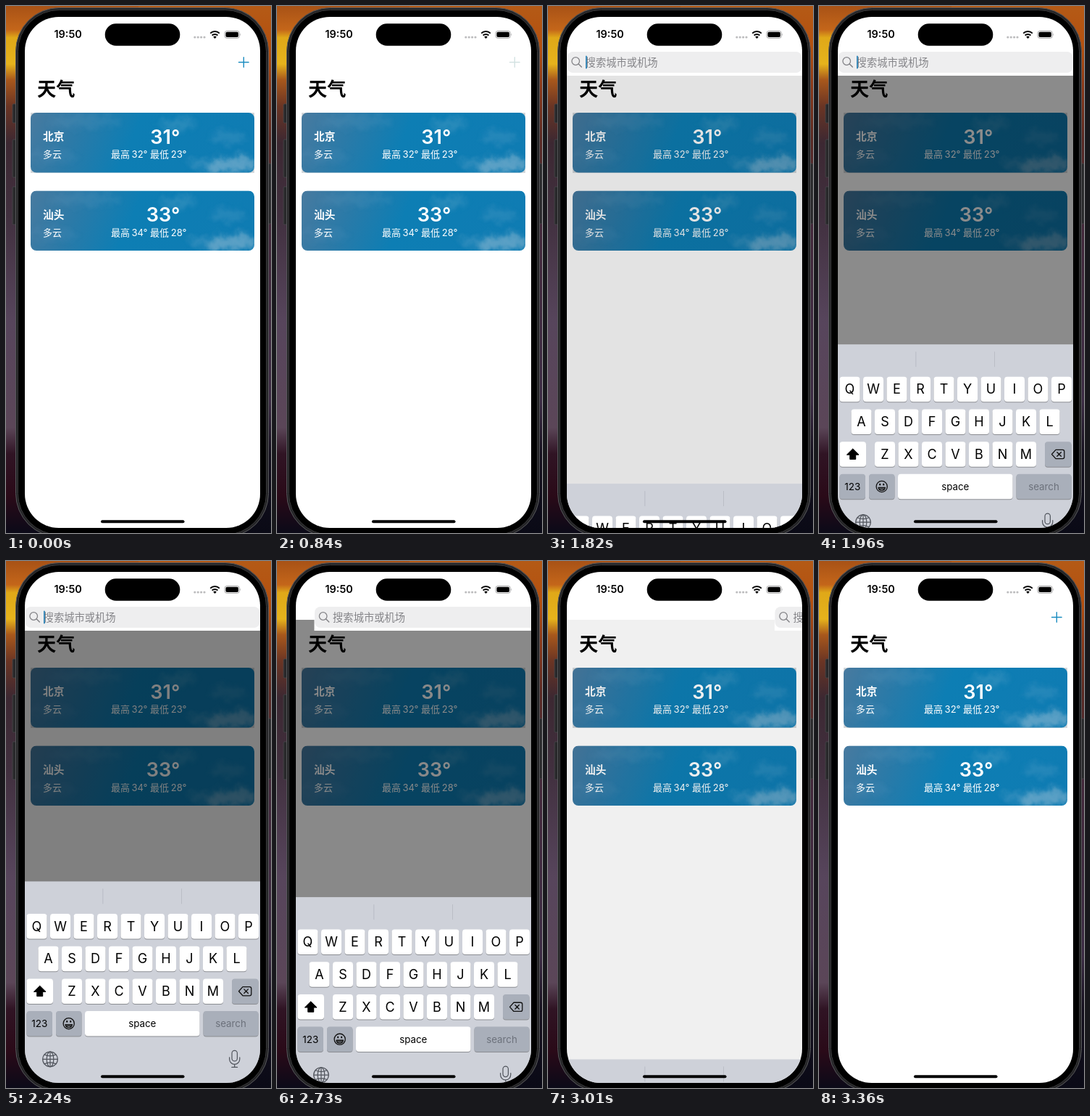
An HTML page for the animation above (3.64 s loop, 366 by 726 pixels).

```html
<!DOCTYPE html>
<html lang="zh">
<head>
<meta charset="utf-8">
<style>
  html, body { margin: 0; width: 100%; height: 100%; overflow: hidden; background: #000; }
  svg { display: block; width: 366px; height: 726px; }
  text { font-family: Inter, "Noto Sans CJK SC", "Noto Sans CJK", sans-serif; white-space: pre; }
  .mid { text-anchor: middle; }
  .end { text-anchor: end; }
  .line { fill: none; stroke-linecap: round; stroke-linejoin: round; }
</style>
</head>
<body>
<svg viewBox="0 0 366 726">
  <defs>
    <linearGradient id="skyL" x2="0" y2="1">
      <stop offset="0" stop-color="#a85216"/><stop offset=".045" stop-color="#c4661a"/>
      <stop offset=".06" stop-color="#dfa818"/><stop offset=".11" stop-color="#e6b31c"/>
      <stop offset=".14" stop-color="#a8581c"/><stop offset=".19" stop-color="#6b3524"/>
      <stop offset=".26" stop-color="#3c2832"/><stop offset=".4" stop-color="#41303f"/>
      <stop offset=".6" stop-color="#57455c"/><stop offset=".8" stop-color="#5b4658"/>
      <stop offset=".85" stop-color="#301424"/><stop offset=".93" stop-color="#2a0a18"/>
      <stop offset="1" stop-color="#0b0a18"/>
    </linearGradient>
    <linearGradient id="skyR" x2="0" y2="1">
      <stop offset="0" stop-color="#b45a16"/><stop offset=".08" stop-color="#b4500f"/>
      <stop offset=".15" stop-color="#8c3a1a"/><stop offset=".25" stop-color="#5a2a24"/>
      <stop offset=".4" stop-color="#43283a"/><stop offset=".75" stop-color="#3c2c44"/>
      <stop offset=".85" stop-color="#15101e"/><stop offset="1" stop-color="#0a0a16"/>
    </linearGradient>
    <linearGradient id="blue" x2="1" y2=".12">
      <stop offset="0" stop-color="#487a9f"/><stop offset=".25" stop-color="#2a7aa8"/>
      <stop offset=".5" stop-color="#0d7eb4"/><stop offset="1" stop-color="#0f7cb3"/>
    </linearGradient>
    <filter id="cloud" x="-5%" y="-10%" width="110%" height="120%">
      <feGaussianBlur stdDeviation="4" result="soft"/>
      <feTurbulence type="fractalNoise" baseFrequency=".07" numOctaves="3" seed="4"/>
      <feDisplacementMap in="soft" scale="16" xChannelSelector="R" yChannelSelector="G"/>
    </filter>
    <clipPath id="screen"><rect x="26" y="15" width="325" height="704" rx="47"/></clipPath>
    <clipPath id="cardClip"><rect width="309" height="82.6" rx="8"/></clipPath>
    <g id="sky" clip-path="url(#cardClip)">
      <rect width="309" height="83" fill="url(#blue)"/>
      <g filter="url(#cloud)" fill="#9dc0d6">
        <ellipse cx="290" cy="69" rx="20" ry="9" opacity=".5"/>
        <ellipse cx="259" cy="71" rx="15" ry="8" opacity=".5"/>
        <ellipse cx="274" cy="78" rx="30" ry="6" opacity=".3"/>
        <ellipse cx="232" cy="72" rx="14" ry="6" opacity=".25"/>
        <ellipse cx="203" cy="16" rx="26" ry="7" opacity=".2"/>
        <ellipse cx="272" cy="34" rx="24" ry="8" opacity=".16"/>
        <ellipse cx="75" cy="12" rx="50" ry="9" opacity=".1"/>
        <ellipse cx="30" cy="60" rx="35" ry="10" opacity=".08"/>
      </g>
    </g>
  </defs>

  <rect width="183" height="726" fill="url(#skyL)"/>
  <rect x="183" width="183" height="726" fill="url(#skyR)"/>

  <g fill="#29292b" stroke="#4a4a4d" stroke-width=".8">
    <rect x="9" y="135" width="6" height="26" rx="1.5"/>
    <rect x="9" y="184" width="6" height="52" rx="1.5"/>
    <rect x="9" y="249" width="6" height="52" rx="1.5"/>
    <rect x="361" y="217" width="5" height="83" rx="1.5"/>
  </g>
  <rect x="13.5" y="2.5" width="349" height="729" rx="60" fill="#242426" stroke="#56575a"/>
  <rect x="16.5" y="5.5" width="343" height="723" rx="57" fill="#000" stroke="#39393b"/>

  <g clip-path="url(#screen)">
    <rect x="26" y="15" width="325" height="704" fill="#fff"/>
    <path id="plus" class="line" d="M321.5 77.5h13.6M328.3 70.7v13.6" stroke-width="1.4"/>
    <text x="43" y="123.5" font-size="26.2" font-weight="700">天气</text>
    <rect x="34" y="147" width="309" height="83" fill="#d3d7da"/>
    <g id="cards"></g>
    <rect id="dim" x="26" y="81" width="325" height="638"/>

    <g id="bar">
      <rect x="26" y="60" width="325" height="36" fill="#fff"/>
      <rect x="26.5" y="63" width="324" height="29" rx="8" fill="#eeeeef"/>
      <path class="line" d="M42.3 80l4 4" stroke="#848488" stroke-width="1.5"/>
      <circle cx="38.2" cy="76" r="5.3" fill="none" stroke="#848488" stroke-width="1.3"/>
      <text x="51.6" y="82.6" font-size="14.3" fill="#858589">搜索城市或机场</text>
      <rect id="caret" x="52" y="68.5" width="1.8" height="18" rx=".9" fill="#2c83b8"/>
    </g>

    <g id="keyboard"></g>
    <rect x="131" y="708.3" width="115.5" height="4" rx="2"/>
  </g>

  <rect x="136.7" y="24.2" width="103.6" height="30.6" rx="15.3"/>
  <text x="66.5" y="44.3" font-size="14.4" font-weight="600">19:50</text>
  <g fill="#bcbcbe">
    <circle cx="260.8" cy="43" r="1.6"/><circle cx="265.2" cy="43" r="1.6"/>
    <circle cx="269.6" cy="43" r="1.6"/><circle cx="274" cy="43" r="1.6"/>
  </g>
  <path class="line" d="M282.2 37.6a9 9 0 0 1 12.6 0M284.6 40.5a5.6 5.6 0 0 1 7.8 0" stroke="#000" stroke-width="2" style="stroke-linecap:butt"/>
  <path d="M286.2 42.6a3.4 3.4 0 0 1 4.6 0l-2.3 2.4z"/>
  <rect x="302" y="34.4" width="20.4" height="10" rx="3.2" fill="none" stroke="#9c9c9e" stroke-width=".9"/>
  <rect x="303.4" y="35.8" width="17.6" height="7.2" rx="2"/>
  <path d="M323.5 37.6q1.4 1.8 0 3.6z" fill="#9c9c9e"/>
</svg>

<script>
const $ = id => document.getElementById(id);

const card = (y, city, temp, high, low) => `
  <g transform="translate(34 ${y})" fill="#fff">
    <use href="#sky"/>
    <text x="17" y="38.3" font-size="14.7" font-weight="700">${city}</text>
    <text x="17" y="62.3" font-size="13">多云</text>
    <text class="end" x="206.3" y="42.6" font-size="27" font-weight="600">${temp}°</text>
    <text x="111" y="62.3" font-size="13">最高</text>
    <text class="end" x="161.5" y="62.3" font-size="13">${high}°</text>
    <text x="165" y="62.3" font-size="13">最低</text>
    <text class="end" x="215.5" y="62.3" font-size="13">${low}°</text>
  </g>`;
$('cards').innerHTML = card(147, '北京', 31, 32, 23) + card(254.4, '汕头', 33, 34, 28);

// Keyboard, drawn with its top edge at y = 0
const WHITE = '#fff', GREY = '#a9afba';
const key = (x, y, w, fill, label = '', size = 18, ink = '#000') => `
  <rect x="${x}" y="${y + 1}" width="${w}" height="34.5" rx="4" fill="#8b8d92"/>
  <rect x="${x}" y="${y}" width="${w}" height="34.5" rx="4" fill="${fill}"/>
  <text class="mid" x="${x + w / 2}" y="${y + 17.2 + size * .36}" font-size="${size}" fill="${ink}">${label}</text>`;
const row = (letters, x, y) =>
  [...letters].map((c, i) => key(x + i * 32.5, y, 28, WHITE, c)).join('');

$('keyboard').innerHTML = `
  <rect x="26" width="325" height="290" fill="#ced1d9"/>
  <path d="M133.8 10v21M242.5 10v21" stroke="#babdc5"/>
  ${row('QWERTYUIOP', 28.5, 44.5)}
  ${row('ASDFGHJKL', 44.5, 89.3)}
  ${key(28.5, 134, 36.5, WHITE)}
  ${row('ZXCVBNM', 77, 134)}
  ${key(312, 134, 36.5, GREY)}
  ${key(28.5, 178.5, 35.5, GREY, '123', 13.5)}
  ${key(69, 178.5, 35.5, GREY)}
  ${key(109, 178.5, 158.5, WHITE, 'space', 13.3)}
  ${key(272.5, 178.5, 76, GREY, 'search', 13.3, '#6c717b')}
  <path d="M46.7 143.8l8.3 8.2h-4.3v6.2h-8v-6.2h-4.3z" stroke="#000" stroke-linejoin="round"/>
  <g class="line" stroke="#111" stroke-width="1.3">
    <path d="M327 145.2h9.5q2.3 0 2.3 2.3v7.6q0 2.3-2.3 2.3h-9.5l-5.5-6.1zM328.8 148.5l5.6 5.6M334.4 148.5l-5.6 5.6"/>
    <circle cx="86.7" cy="195.8" r="7.6"/>
    <path d="M82 197.2h9.4q-.8 4-4.7 4t-4.7-4zM82.8 199h7.8"/>
  </g>
  <ellipse cx="84.2" cy="193" rx="1" ry="1.4"/><ellipse cx="89.2" cy="193" rx="1" ry="1.4"/>
  <g class="line" stroke="#50545c" stroke-width="1.2">
    <circle cx="61" cy="245" r="10.3"/>
    <ellipse cx="61" cy="245" rx="4.8" ry="10.3"/>
    <path d="M61 234.7v20.6M50.7 245h20.6M53 238.5q8 4 16 0M53 251.5q8-4 16 0"/>
    <rect x="312" y="233" width="7.4" height="14.5" rx="3.7"/>
    <path d="M308.6 242.5v2.3a7.1 7.1 0 0 0 14.2 0v-2.3M315.7 252v4M311.8 256h7.8"/>
  </g>`;

const LOOP = 3640, STEP = 70, WIDTH = 325, KEYBOARD_TOP = 441.3, SCREEN_BOTTOM = 719;
const progress = (t, start, length) => Math.min(1, Math.max(0, (t - start) / length));
const ease = p => p < .5 ? 2 * p * p : 1 - 2 * (1 - p) ** 2;
const spring = ms => {
  const x = Math.max(0, ms) * .0225;
  return 1 - (1 + x) * Math.exp(-x);
};

function draw(now) {
  const t = Math.floor(now % LOOP / STEP) * STEP;
  const leave = ease(progress(t, 2631, 500));
  const bar = ease(progress(t, 880, 300)) - leave;
  const open = spring(t - 1781) * (1 - leave);

  $('plus').setAttribute('stroke', t >= 840 && t < 1190 ? '#d3e2e2' : '#1a8cc0');
  $('bar').setAttribute('transform', `translate(${WIDTH * (1 - bar)} 0)`);
  $('caret').setAttribute('opacity', t >= 1680 && t < 2380 ? 1 : 0);
  $('dim').setAttribute('opacity', open / 2);
  const top = SCREEN_BOTTOM - (SCREEN_BOTTOM - KEYBOARD_TOP) * open;
  $('keyboard').setAttribute('transform', `translate(0 ${top})`);
}

const begin = performance.now();
(function tick() {
  draw(performance.now() - begin);
  requestAnimationFrame(tick);
})();
</script>
</body>
</html>
```
